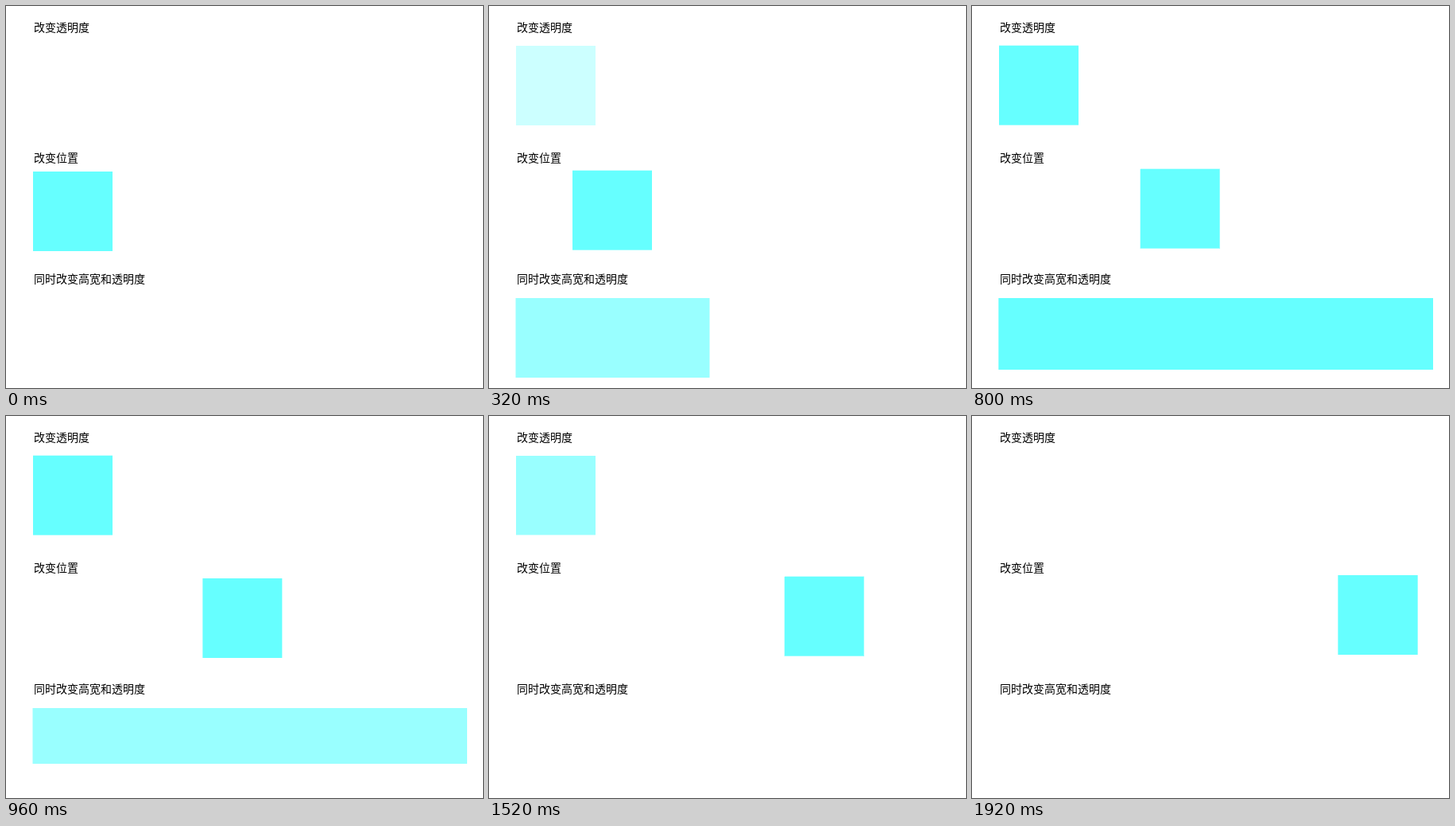
These frames come from a looping animation (600x480 px, 2 s). An HTML page with a canvas:

```html
<!DOCTYPE html>
<html lang="zh-CN">
<head>
<meta charset="utf-8">
<title>补间动画</title>
<style>
  html, body {
    margin: 0;
    width: 100%;
    height: 100%;
    overflow: hidden;
    background: #fff;
  }
  canvas {
    position: absolute;
    left: 0;
    top: 0;
  }
  p {
    position: absolute;
    left: 35px;
    margin: 0;
    font: 14px/14px "Noto Sans CJK SC", "Noto Sans CJK", sans-serif;
    color: #000;
    white-space: nowrap;
  }
</style>
</head>
<body>
<canvas id="stage" width="600" height="480"></canvas>
<p style="top: 19px">改变透明度</p>
<p style="top: 183px">改变位置</p>
<p style="top: 335px">同时改变高宽和透明度</p>
<script>
  const STEP = 80;
  const STEPS = 25;
  const ctx = document.getElementById("stage").getContext("2d");

  // The palette holds only four tints between white and cyan.
  function tint(alpha) {
    const red = 255 - 153 * alpha;
    if (red >= 229) return null;
    if (red >= 192) return "#ccffff";
    return red >= 128 ? "#99ffff" : "#66ffff";
  }

  // Splits a length into whole pixels and partly covered ends.
  function spans(start, size) {
    const end = start + size;
    const first = Math.ceil(start);
    const last = Math.floor(end);
    if (last < first) return [[last, 1, size]];
    return [
      [first - 1, 1, first - start],
      [first, last - first, 1],
      [last, 1, end - last]
    ];
  }

  function block(x, y, w, h, alpha) {
    for (const [top, height, coverY] of spans(y, h)) {
      for (const [left, width, coverX] of spans(x, w)) {
        const color = tint(alpha * coverX * coverY);
        if (!color) continue;
        ctx.fillStyle = color;
        ctx.fillRect(left, top, width, height);
      }
    }
  }

  function draw(k) {
    ctx.clearRect(0, 0, 600, 480);

    block(34, 49.7, 100, 100, 1 - Math.abs(k - 12) / 12);
    block(34 + 17.77 * k, 208 - k / 3, 100, 100, 1);

    // The bar grows wide for 9 steps, then flattens for 10.
    const shrink = Math.max(0, k - 9) / 10;
    if (shrink < 1) {
      const grow = Math.min(k, 9);
      block(33.5, 367, 2 + 60.5 * grow, 100 * (1 - shrink), grow / 9 - shrink);
    }
  }

  const start = performance.now();
  function tick() {
    const elapsed = performance.now() - start;
    draw(Math.floor(elapsed / STEP) % STEPS);
    requestAnimationFrame(tick);
  }
  tick();
</script>
</body>
</html>
```
